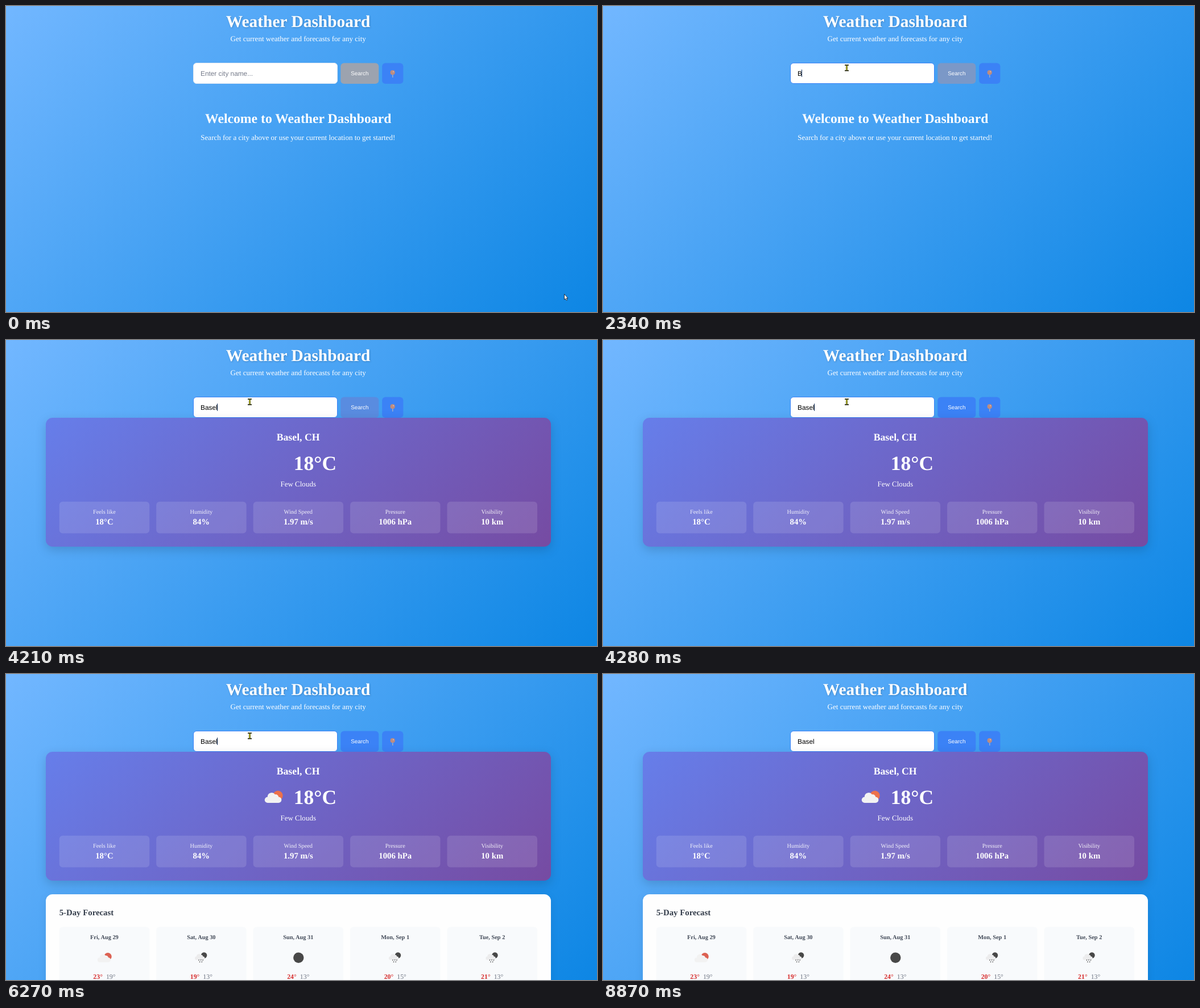
Write an HTML page that moves like this. It is 1039x539 px and loops after 8.94 s.

```html
<!DOCTYPE html>
<html lang="en">
<head>
<meta charset="utf-8">
<title>Weather Dashboard</title>
<style>
html, body { margin: 0; width: 100%; height: 100%; overflow: hidden; }
body { background: linear-gradient(135deg, #72b7ff 0%, #0d86e4 100%); }
svg { display: block; width: 1039px; height: 539px; }
text { font-family: "Liberation Serif", "Times New Roman", serif; fill: #fff; text-rendering: geometricPrecision; white-space: pre; }
.sans { font-family: "Liberation Sans", Arial, sans-serif; }
.b { font-weight: 700; }
.mid { text-anchor: middle; }
.title { filter: drop-shadow(1.5px 1.5px 1.5px rgba(0, 0, 0, .2)); }
.raised { filter: drop-shadow(0 6px 9.3px rgba(0, 0, 0, .15)); }
.flat { filter: drop-shadow(0 3px 7px rgba(0, 0, 0, .07)); }
</style>
</head>
<body>
<svg id="stage" viewBox="0 0 1039 539" xmlns="http://www.w3.org/2000/svg">
  <defs>
    <linearGradient id="violet" gradientUnits="userSpaceOnUse" x1="235.1" y1="-28.1" x2="792.6" y2="529.3">
      <stop offset="0" stop-color="#667eea"/><stop offset="1" stop-color="#764ba2"/>
    </linearGradient>
    <path id="cloud" d="M-10.3 10.2A5.2 5.2 0 0 1 -10.6 -.2A7.3 7.3 0 0 1 2.6 -4.6A5 5 0 0 1 8.8 -.4A5.3 5.3 0 0 1 8.6 10.2Z"/>
    <g id="sunny"><circle cx="7.6" cy="-2.6" r="8.6"/><use href="#cloud" fill="#f2f2f2"/></g>
    <g id="rainy">
      <circle cx="4.6" cy="-4.2" r="5.2" fill="#484848"/>
      <use href="#cloud" transform="translate(-2.4 -2) scale(.58)" fill="#ececed"/>
      <path d="M-4 3.4l-.9 1.6M-.4 3.2l-.9 1.6M3 3.4l-.9 1.6M-2.4 6.6l-.9 1.6M1.2 6.6l-.9 1.6" stroke="#505050" stroke-width="1.3" fill="none"/>
    </g>
  </defs>
</svg>
<script>
const LOOP = 8940, CENTER = 513.9, CITY = "Basel";
const KEYS = [2270, 2480, 2670, 2870, 3070];
const FOCUS = 940, SUBMIT = 3810, RESULT = 4080, FORECAST = 4340, BLINK = 527;
const BLUE = [59, 130, 246], GREY = [156, 163, 175], PALE = [225, 232, 242];

const stage = document.getElementById("stage");
const label = (x, y, size, str, cls = "mid", extra = "") =>
  `<text x="${x}" y="${y}" font-size="${size}" class="${cls}" ${extra}>${str}</text>`;
const box = (x, y, w, h, r, fill, extra = "") =>
  `<rect x="${x}" y="${y}" width="${w}" height="${h}" rx="${r}" fill="${fill}" ${extra}/>`;
const column = i => 172.9 + 170.45 * i;

const header =
  label(CENTER - .3, 37, 29.45, "Weather Dashboard", "b mid title") +
  label(CENTER - .2, 61.6, 13.02, "Get current weather and forecasts for any city");

const search =
  box(329.5, 100.5, 253, 36, 5.5, "#fff", 'id="field" stroke-width="1"') +
  label(342, 123, 11.84, "Enter city name...", "sans", 'id="hint" style="fill:#757b8a"') +
  label(342, 123, 11.84, "", "sans", 'id="typed" style="fill:#000"') +
  box(342, 112, 1, 13, 0, "#14305c", 'id="caret"') +
  box(588.3, 100.4, 67, 36.7, 5.9, "#3b82f6", 'id="button"') +
  label(621.8, 122, 9.87, "Search", "sans mid") +
  box(661.2, 100.4, 37.2, 36.7, 5.9, "#3b82f6") +
  '<path d="M679.8 120V126" stroke="#a9b4c8" stroke-width="1.3"/>' +
  '<circle cx="679.7" cy="117.2" r="4.1" fill="#bd8c80"/><circle cx="681" cy="115.8" r="1" fill="#dcbcb4"/>';

const welcome =
  label(CENTER - .2, 206, 23.68, "Welcome to Weather Dashboard", "b mid") +
  label(CENTER - .6, 236, 13.02, "Search for a city above or use your current location to get started!");

const details = [["Feels like", "18°C"], ["Humidity", "84%"], ["Wind Speed", "1.97 m/s"],
  ["Pressure", "1006 hPa"], ["Visibility", "10 km"]];
const current =
  box(70, 137, 888, 227, 11.84, "url(#violet)", 'class="raised"') +
  label(CENTER - .3, 177, 17.76, "Basel, CH", "b mid") +
  label(505.8, 229, 35.52, "18°C", "b") +
  label(CENTER - .2, 258, 13.02, "Few Clouds") +
  details.map(([name, value], i) =>
    box(column(i) - 79.2, 284.8, 158.5, 55.7, 5.9, "rgba(255,255,255,.12)") +
    label(column(i), 306.3, 10.36, name, "mid", 'opacity=".9"') +
    label(column(i), 325.4, 14.8, value, "b mid")).join("");

const icons = {
  cloud: '<use href="#sunny" fill="#dc6152" transform="scale(.78)"/>',
  rain: '<use href="#rainy"/>',
  clear: '<circle cx=".3" r="9.2" fill="#484848"/>'
};
const days = [["Fri, Aug 29", "cloud", 23, 19], ["Sat, Aug 30", "rain", 19, 13],
  ["Sun, Aug 31", "clear", 24, 13], ["Mon, Sep 1", "rain", 20, 15], ["Tue, Sep 2", "rain", 21, 13]];
const forecast =
  box(70, 388, 888, 180, 11.84, "#fefefe", 'class="flat"') +
  label(93.7, 424.6, 14.8, "5-Day Forecast", "b", 'style="fill:#343d4b"') +
  days.map(([day, icon, high, low], i) => {
    const x = column(i);
    return box(x - 79.2, 445.5, 158.5, 120, 5.9, "#f8fafc") +
      label(x, 467, 10.36, day, "b mid", 'style="fill:#414957"') +
      `<g transform="translate(${x + .2} 499.7)">${icons[icon]}</g>` +
      label(x - 19.6, 537, 11.84, high + "°", "b", 'style="fill:#d62b2b"') +
      label(x + 3, 537, 11.84, low + "°", "", 'style="fill:#6b7280"');
  }).join("");

const pointer =
  '<path id="arrow" d="M0 0V9.6L2.1 7.8L3.6 11L5.3 10.2L3.8 7.2H6.5Z" stroke="#1c2430" stroke-width=".9"/>' +
  '<g id="beam"><path d="M0 -4.5V4.5" stroke="#4a4a12" stroke-width="3"/>' +
  '<path d="M0 -4V4" stroke="#d8d83a" stroke-width="1.3"/>' +
  '<path d="M-3.5 -4.8H3.5M-3.5 4.8H3.5" stroke="#2e3018" stroke-width="1.8"/></g>';

const group = (id, content) => `<g id="${id}">${content}</g>`;
stage.insertAdjacentHTML("beforeend", header + search + group("welcome", welcome) + group("current", current) +
  group("forecast", forecast +
    '<use href="#sunny" fill="#ec714b" transform="translate(470.4 216.8)"/>') +
  group("pointer", pointer));

const el = Object.fromEntries([...stage.querySelectorAll("[id]")].map(node => [node.id, node]));
const show = (node, on) => node.setAttribute("display", on ? "inline" : "none");
const ramp = (t, from, to) => Math.min(1, Math.max(0, (t - from) / (to - from)));
const smooth = u => u * u * (3 - 2 * u);
const lerp = (a, b, u) => a + (b - a) * u;
const between = (a, b, u) => a.map((v, i) => lerp(v, b[i], u));
const mix = (a, b, u) => `rgb(${between(a, b, u).map(Math.round)})`;

const HOME = [981.5, 507.5], INPUT = [428.5, 109], BEND = [679, 335], EDGE = [939, 525], OUT = [1010.5, 533.5];
function pointerAt(t) {
  if (t < 7230) return between(HOME, INPUT, smooth(ramp(t, 10, FOCUS)));
  if (t < 8140) {
    const u = 1 - (1 - ramp(t, 7230, 8140)) ** 1.6;
    return between(between(INPUT, BEND, u), between(BEND, EDGE, u), u);
  }
  return between(EDGE, OUT, ramp(t, 8140, 8340));
}

function drawInput(t) {
  const count = KEYS.filter(key => t >= key).length;
  const anchor = count ? KEYS[count - 1] : FOCUS;
  el.typed.textContent = CITY.slice(0, count);
  show(el.hint, !count);
  const width = count ? el.typed.getComputedTextLength() : 0;
  el.caret.setAttribute("x", Math.floor(342 + width));
  show(el.caret, t >= FOCUS && Math.floor((t - anchor) / BLINK) % 2 === 0);
  el.field.setAttribute("stroke", mix(PALE, BLUE, ramp(t, FOCUS, 1090)));
  const enabled = ramp(t, KEYS[0], 2480) - ramp(t, SUBMIT, 4010) + ramp(t, RESULT, 4270);
  el.button.setAttribute("fill", mix(GREY, BLUE, enabled));
}

function drawPointer(t) {
  const [x, y] = pointerAt(t);
  const inField = x > 329 && x < 582 && y > 100 && y < 137;
  el.pointer.setAttribute("transform", `translate(${x} ${y})`);
  el.arrow.setAttribute("fill", t < 4000 ? "#fff" : "#f2e21c");
  show(el.arrow, !inField);
  show(el.beam, inField);
  show(el.pointer, t < 8600);
}

function render(t) {
  drawInput(t);
  show(el.welcome, t < SUBMIT);
  show(el.current, t >= RESULT);
  show(el.forecast, t >= FORECAST);
  drawPointer(t);
}

const start = performance.now();
function tick() {
  render((performance.now() - start) % LOOP);
  requestAnimationFrame(tick);
}
tick();
</script>
</body>
</html>
```
